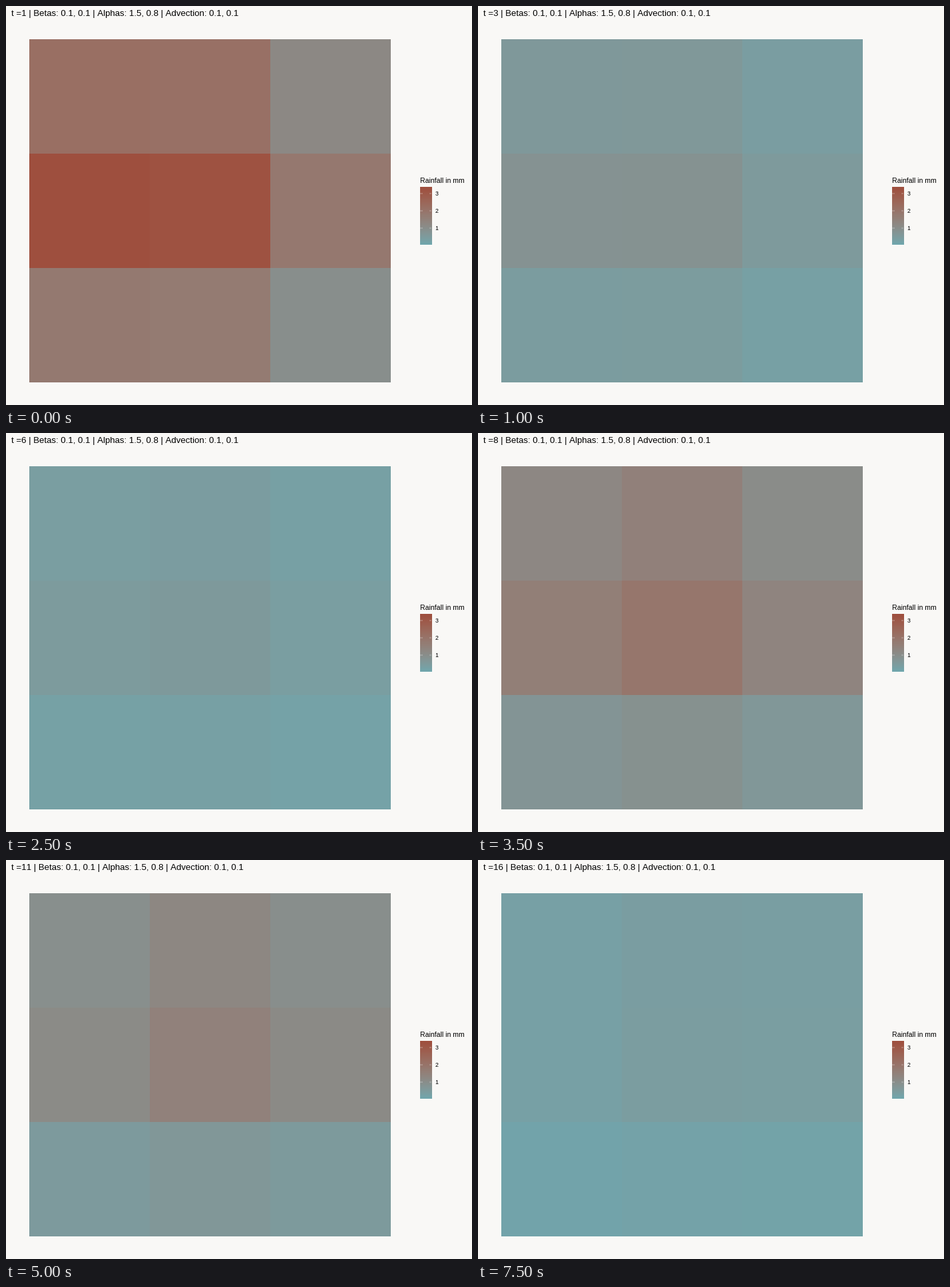
Recreate the animation shown at these times as a matplotlib script. Size 700x600 px, loop 8 s.

```python
import matplotlib.pyplot as plt
import numpy as np
from matplotlib.animation import FuncAnimation

W, H, DPI = 700, 600, 100
STEPS, STEP_MS = 16, 500
PX = 72 / DPI  # points per pixel
LOW, HIGH = (112, 166, 173), (159, 78, 61)

M = np.array([[0.4124, 0.3576, 0.1805],
              [0.2126, 0.7152, 0.0722],
              [0.0193, 0.1192, 0.9505]])
WHITE = M.sum(axis=1)


def rgb_to_lab(rgb):
    c = np.array(rgb) / 255
    lin = np.where(c > 0.04045, ((c + 0.055) / 1.055) ** 2.4, c / 12.92)
    x, y, z = np.cbrt(M @ lin / WHITE)
    return np.array([116 * y - 16, 500 * (x - y), 200 * (y - z)])


def lab_to_rgb(lab):
    y = (lab[..., 0] + 16) / 116
    f = np.stack([y + lab[..., 1] / 500, y, y - lab[..., 2] / 200], axis=-1)
    lin = np.clip((f ** 3 * WHITE) @ np.linalg.inv(M).T, 0, 1)
    return np.where(lin > 0.0031308, 1.055 * lin ** (1 / 2.4) - 0.055, 12.92 * lin)


LAB_LOW, LAB_HIGH = rgb_to_lab(LOW), rgb_to_lab(HIGH)


def ramp(x):
    """Colour of a rainfall share between 0 and 1, blended in Lab space."""
    x = np.clip(x, 0, 1)[..., None]
    return lab_to_rgb(LAB_LOW + (LAB_HIGH - LAB_LOW) * x)


def intensity(t):
    """Rainfall share of the middle cell: fading showers and dry spells."""
    shower = np.interp(t, (1, 5, 8, 11), (0.955, 0.77, 0.56, 0.43))
    drizzle = np.interp(t, (3, 6, 16), (0.235, 0.145, 0.105))
    wet = max(1 - (t - 1) / 2, 4 <= t <= 5, 8 <= t <= 12, 0)
    return drizzle + (shower - drizzle) * wet


def rain(t):
    """A Gaussian storm cell that drifts to the upper right over the 3x3 grid."""
    cx = -0.55 + 0.058 * (t - 1)
    cy = 0.10 + 0.024 * (t - 1)
    pos = np.array([-1, 0, 1])
    col = np.exp(-0.28 * ((pos - cx) ** 2 - cx ** 2))
    row = np.exp(-0.53 * ((pos - cy) ** 2 - cy ** 2))[::-1]
    return intensity(t) * np.outer(row, col)


plt.rcParams["font.family"] = "Liberation Sans"
plt.rcParams["text.kerning_factor"] = 6  # plain advances, no kerned pairs
fig = plt.figure(figsize=(W / DPI, H / DPI), dpi=DPI, facecolor="#F9F8F6")
ax = fig.add_axes([0, 0, 1, 1])
ax.axis("off")


def label(x, y, text, size):
    return ax.text(x, y, text, fontsize=size * PX, color="black", va="baseline")


def title(t):
    return f"t ={t} | Betas: 0.1, 0.1 | Alphas: 1.5, 0.8 | Advection: 0.1, 0.1"


grid = ax.imshow(ramp(rain(1)), extent=(35, 578, 566, 50),
                 interpolation="nearest", aspect="auto")
heading = label(8, 15.5, title(1), 13.2)

# colour bar
ax.imshow(ramp(np.linspace(1, 0, 86))[:, None], extent=(622, 639.3, 359.4, 273),
          interpolation="nearest", aspect="auto")
label(622, 266, "Rainfall in mm", 10.5)
for mm in (1, 2, 3):
    y = 359.5 - 26 * mm
    for x in (622, 635.8):
        ax.plot([x, x + 3.5], [y, y], color="white", lw=0.4 * PX,
                solid_capstyle="butt")
    label(644.5, y + 3.3, str(mm), 8.8)

ax.set_xlim(0, W)
ax.set_ylim(H, 0)


def update(i):
    grid.set_data(ramp(rain(i + 1)))
    heading.set_text(title(i + 1))
    return grid, heading


anim = FuncAnimation(fig, update, frames=STEPS, interval=STEP_MS,
                     repeat=True, repeat_delay=0)
plt.show()
```
